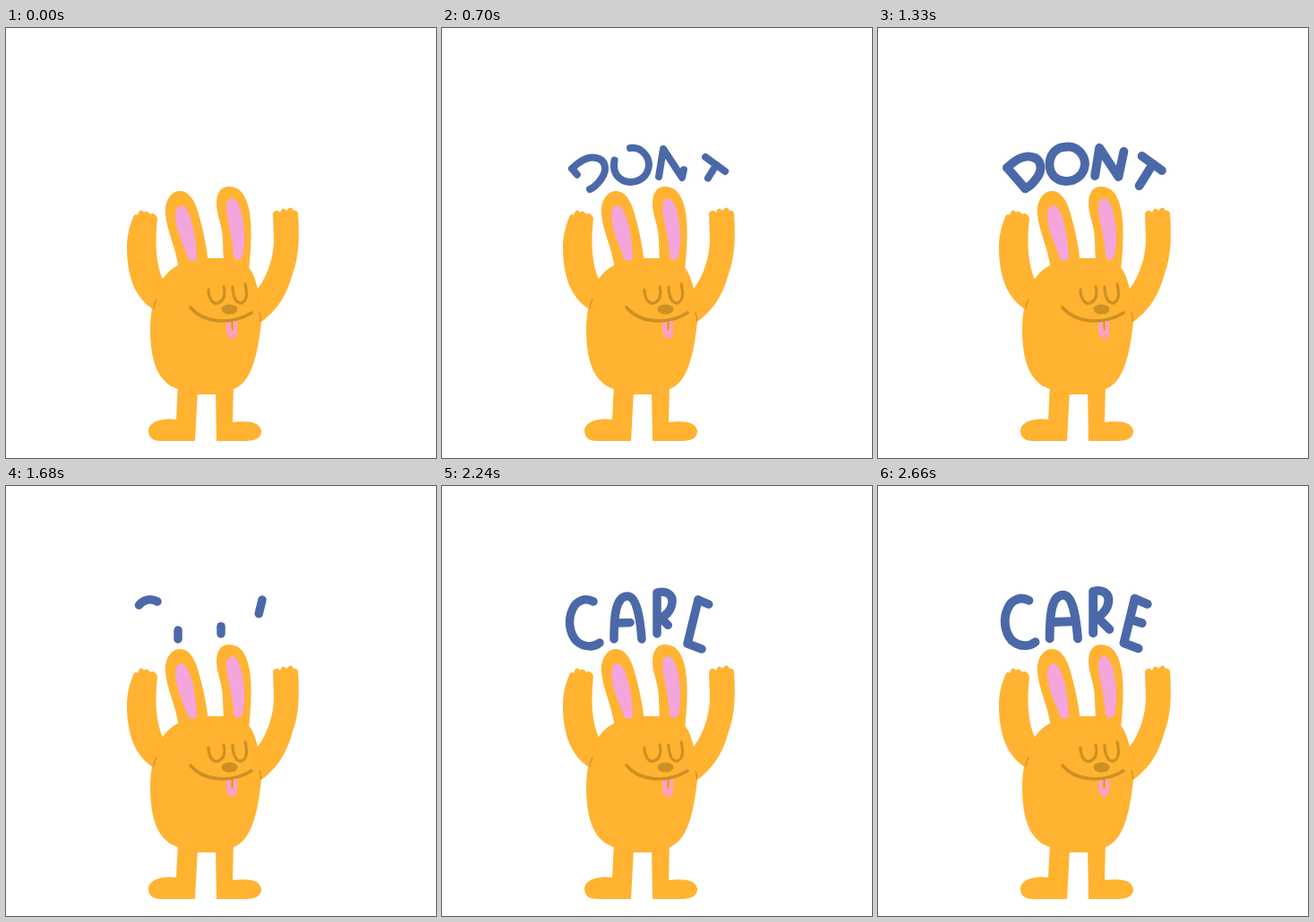
These frames come from a looping animation (480x480 px, 2.73 s). An HTML page with a canvas:

```html
<!DOCTYPE html>
<html lang="en">
<head>
<meta charset="utf-8">
<title>Don't care bunny</title>
<style>
html, body { margin: 0; width: 100%; height: 100%; overflow: hidden; background: #fff; }
canvas { display: block; width: 100vw; height: 100vh; object-fit: contain; }
</style>
</head>
<body>
<canvas id="stage" width="480" height="480"></canvas>
<script>
const ctx = document.getElementById('stage').getContext('2d');
const LOOP = 2730, TICK = 70;
const ORANGE = '#ffb331', PINK = '#f3a5dc', TONGUE = '#f9a0cb', BROWN = '#cd9022', BLUE = '#4b69a8';

function fill(color, d) {
  ctx.fillStyle = color;
  ctx.fill(new Path2D(d));
}

function line(color, width, d) {
  ctx.strokeStyle = color;
  ctx.lineWidth = width;
  ctx.stroke(new Path2D(d));
}

// A pen stroke that knows its own length
function pen(d) {
  const el = document.createElementNS('http://www.w3.org/2000/svg', 'path');
  el.setAttribute('d', d);
  return { path: new Path2D(d), length: el.getTotalLength() };
}

function letter(pace, ...strokes) {
  const pens = strokes.map(pen);
  return { pace, pens, total: pens.reduce((sum, p) => sum + p.length, 0) };
}

const steady = p => p;
const smooth = p => p * p * (3 - 2 * p);
const quick = p => Math.min(1, p * 1.45);

const DONT = {
  cx: 230, cy: 156, start: 210, steps: 10, thick: 1050, end: 1400, width: 8,
  letters: [
    letter(steady, 'M145 157C155 147 164 143 172 145C184 147 184 160 178 168Q172 177 165 180', 'M145 157L165 180'),
    letter(steady, 'M210 134C222 132 231 143 231 153C230 165 221 172 210 172C198 171 191 163 192 151C193 141 200 134 210 134'),
    letter(steady, 'M242 166L247 135L268 167L274 139'),
    letter(steady, 'M294 144L316 160', 'M306 153L291 177')
  ]
};

const CARE = {
  cx: 222, cy: 150, start: 1610, steps: 12, thick: 2380, end: LOOP, width: 9.5,
  letters: [
    letter(quick, 'M169 129C160 124 150 128 146 137C140 149 142 164 150 173C159 181 170 180 176 175'),
    letter(smooth, 'M192 171C192 148 193 123 207 123C217 123 221 146 223 171', 'M194 153L220 152'),
    letter(smooth, 'M240 165L240 119C251 116 258 122 257 130C256 139 250 145 244 147L258 161'),
    letter(steady, 'M286 127L274 176L290 182', 'M286 127L300 133', 'M281 150L294 154')
  ]
};

function write(glyph, progress) {
  let left = glyph.pace(progress) * glyph.total;
  for (const { path, length } of glyph.pens) {
    if (left <= 0) break;
    ctx.setLineDash(left >= length - 0.01 ? [] : [left, 1000]);
    ctx.stroke(path);
    left -= length;
  }
  ctx.setLineDash([]);
}

function drawWord(word, t) {
  if (t < word.start || t >= word.end) return;
  const step = Math.floor((t - word.start) / TICK) + 1;
  const progress = Math.min(1, step / word.steps);
  const bold = t >= word.thick;
  const odd = bold && Math.floor((t - word.thick) / TICK) % 2;
  ctx.save();
  ctx.strokeStyle = BLUE;
  ctx.lineWidth = bold ? 9.8 : word.width;
  if (bold) {
    const scale = odd ? 1.025 : 1.01;
    ctx.translate(word.cx, word.cy - 1);
    ctx.scale(scale, scale);
    ctx.translate(-word.cx, -word.cy);
  }
  word.letters.forEach(glyph => write(glyph, progress));
  ctx.restore();
}

function drawBunny() {
  // Arms
  fill(ORANGE, 'M168 316C143 303 135 275 135 245C135 229 139 219 142 211Q144 206 147 209Q150 200 154 206Q157 202 161 208Q165 205 169 212C166 240 167 264 176 283L190 300Z');
  fill(ORANGE, 'M298 207Q301 201 306 206Q309 198 313 204Q318 197 321 204Q326 203 326 208C328 238 326 258 320 274C315 292 307 312 285 328L272 312L279 293C288 284 299 260 299 236Z');
  // Legs
  fill(ORANGE, 'M192 398L190 437C178 435 159 438 159 450Q160 461 172 461L211 461L214 404Z');
  fill(ORANGE, 'M234 404L235 461L270 461Q285 460 285 450C284 439 268 438 253 440L254 398Z');
  // Body and ears
  fill(ORANGE, 'M192 403C170 396 161 373 161 335C162 301 172 274 192 265C205 258 216 257 226 257L243 257C261 257 272 264 277 278C283 294 285 312 285 328C281 365 274 396 254 403Q252 409 238 409L210 409Q196 408 192 403Z');
  fill(ORANGE, 'M193 270C190 245 179 226 178 207C177 192 185 182 194 182C207 182 213 198 217 215C221 230 224 245 226 264Z');
  fill(ORANGE, 'M243 264L242 238C242 220 235 210 235 196C235 184 240 177 249 177C262 177 269 188 272 206C275 228 273 250 271 272Z');
  fill(PINK, 'M196 198C206 199 213 235 213 258Q209 261 204 259C197 240 189 225 189 209C189 202 192 198 196 198Z');
  fill(PINK, 'M252 190C262 190 267 220 266 240Q265 259 259 259Q255 259 254 254C253 230 246 215 246 201C246 194 248 190 252 190Z');
  // Armpits
  line(BROWN, 1.2, 'M168 303Q165 308 165 313');
  line(BROWN, 1.2, 'M283 318Q285 323 284 327');
  // Face
  fill(TONGUE, 'M246 326L258 325L258 340Q257 347 252 347Q247 346 246 338Z');
  line(ORANGE, 3, 'M252.5 328L252.5 337');
  line(BROWN, 1.4, 'M252.5 328L252.5 336');
  line(BROWN, 3.6, 'M206 312C219 328 249 333 274 318');
  line(BROWN, 3.2, 'M226 292C226 302 231 309 237 307C244 304 245 296 243 289');
  line(BROWN, 3.2, 'M253 289C253 300 257 308 263 307C270 304 269 294 267 286');
  ctx.fillStyle = BROWN;
  ctx.beginPath();
  ctx.ellipse(249.5, 314, 9, 5.5, 0, 0, Math.PI * 2);
  ctx.fill();
}

ctx.lineCap = ctx.lineJoin = 'round';

function frame() {
  const t = performance.now() % LOOP;
  ctx.fillStyle = '#fff';
  ctx.fillRect(0, 0, 480, 480);
  drawBunny();
  drawWord(DONT, t);
  drawWord(CARE, t);
  requestAnimationFrame(frame);
}
frame();
</script>
</body>
</html>
```
